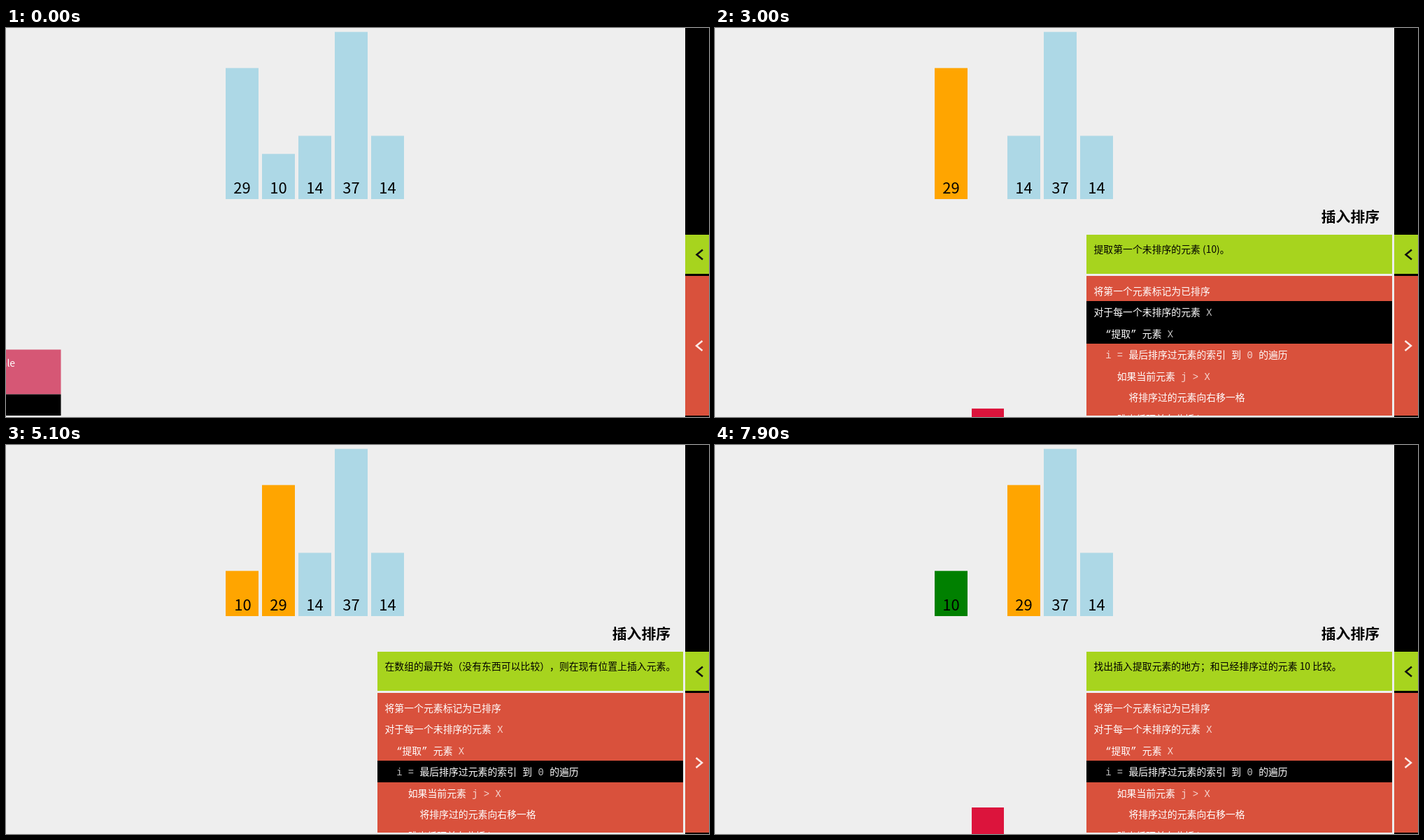
Recreate the animation shown at these times as an HTML page. Size 1005x557 px, loop 8 s.

```html
<!DOCTYPE html>
<html lang="zh-CN">
<head>
<meta charset="utf-8">
<title>插入排序</title>
<style>
  html, body { margin: 0; width: 100%; height: 100%; overflow: hidden; background: #eee; }
  svg { display: block; }
  text { font-family: "Noto Sans CJK SC", "Noto Sans CJK", sans-serif; font-size: 13.87px; text-spacing-trim: space-all; }
  .label { font-size: 22px; text-anchor: middle; }
  .title { font-size: 20.8px; font-weight: 700; text-anchor: end; }
  .code text { font-family: "Liberation Mono", "Noto Sans CJK SC", "Noto Sans CJK", monospace; fill: #fff; }
  .code tspan { fill-opacity: .75; }
  .chevron { fill: none; stroke-width: 2.5; }
</style>
</head>
<body>
<svg id="stage" width="1005" height="557" viewBox="0 0 1005 557">
  <rect width="1005" height="557" fill="#eee"/>
  <g id="bars"></g>

  <g id="menu">
    <rect x="-300" y="460.5" width="378.5" height="64" fill="#d65775"/>
    <rect x="-300" y="524.5" width="378.5" height="30.5"/>
    <text x="13" y="485" text-anchor="end" fill="#fff">scale</text>
  </g>

  <text id="title" class="title" x="950" y="278">插入排序</text>

  <svg class="panel" y="296" height="56">
    <rect width="437" height="56" fill="#a7d41e"/>
    <text id="status" x="10.5" y="26.3"></text>
  </svg>
  <svg class="panel code" y="355" height="200">
    <rect width="437" height="200" fill="#d9513c"/>
    <rect id="mark" width="437"/>
    <g id="code"></g>
  </svg>

  <rect x="971" width="34" height="557"/>
  <rect x="971" y="296" width="34" height="56" fill="#a7d41e"/>
  <rect x="971" y="355" width="34" height="200" fill="#d9513c"/>
  <path class="chevron" d="M996 317.5L987.5 324.5L996 331.5" stroke="#111"/>
  <path id="arrow" class="chevron" d="M995.5 448L987 455L995.5 462" stroke="#fbe9e6"/>
</svg>
<script>
const LOOP = 8000, TICK = 100;
const OPEN = { start: 700, lead: 40, length: 500 };
const MOVE = { lead: 67, length: 250 };
const BLUE = [173, 216, 230], ORANGE = [255, 165, 0], GREEN = [0, 128, 0], RED = [220, 20, 60];
const values = [29, 10, 14, 37, 14];
const FLOOR = 245, UNIT = 6.47, DROP = 364.6;
const ROW = 30.55, PAD = 5.6;

// [indent, text]
const code = [
  [0, '将第一个元素标记为已排序'],
  [0, '对于每一个未排序的元素 X'],
  [2, '“提取” 元素 X'],
  [2, 'i = 最后排序过元素的索引 到 0 的遍历'],
  [4, '如果当前元素 j > X'],
  [6, '将排序过的元素向右移一格'],
  [4, '跳出循环并在此插入 X'],
];

const extract = n => `提取第一个未排序的元素 (${n})。`;
const compare = n => `找出插入提取元素的地方；和已经排序过的元素 ${n} 比较。`;
const shift = (a, b) => `${a} > ${b} 为真，因此将已经排序过的元素 (${a}) 向右移一格。`;

// [time, status, first row, last row, { bar: [slot, dropped, colour, label shift] }]
const steps = [
  [2100, '将第一个元素 (29) 标记为已经排序过。', 0, 0, { 0: [0, 0, ORANGE] }],
  [2800, extract(10), 1, 2, { 1: [1, 1, RED] }],
  [3500, compare(29), 3, 3, { 0: [0, 0, GREEN] }],
  [4200, shift(29, 10), 4, 5, { 0: [1, 0, GREEN], 1: [0, 1, RED] }],
  [4900, '在数组的最开始（没有东西可以比较），则在现有位置上插入元素。', 3, 3,
    { 0: [1, 0, ORANGE], 1: [0, 0, ORANGE, 1] }],
  [5600, extract(14), 1, 2, { 1: [0, 0, ORANGE], 2: [2, 1, RED] }],
  [6300, compare(29), 3, 3, { 0: [1, 0, GREEN] }],
  [7000, shift(29, 14), 4, 5, { 0: [2, 0, GREEN], 2: [1, 1, RED] }],
  [7700, compare(10), 3, 3, { 0: [2, 0, ORANGE], 1: [0, 0, GREEN] }],
];

const states = [values.map((v, i) => [i, 0, BLUE])];
for (const step of steps) states.push(Object.assign([...states.at(-1)], step[4]));

const $ = id => document.getElementById(id);
const set = (el, attrs) => { for (const k in attrs) el.setAttribute(k, attrs[k]); return el; };
const add = (parent, tag, attrs) =>
  parent.appendChild(set(document.createElementNS('http://www.w3.org/2000/svg', tag), attrs));
const clamp = t => Math.min(1, Math.max(0, t));
const mix = (a, b, p) => a + (b - a) * p;
const swing = t => 0.5 - Math.cos(Math.PI * t) / 2;
const cubic = t => t < 0.5 ? 4 * t ** 3 : 1 - 4 * (1 - t) ** 3;

const bars = values.map(v => {
  const label = { class: 'label' };
  const bar = { rect: add($('bars'), 'rect', { height: v * UNIT }), text: add($('bars'), 'text', label) };
  bar.text.textContent = v;
  return bar;
});

code.forEach(([indent, line], i) => {
  const text = add($('code'), 'text', { x: 10.5 + indent * 8.32, y: 26.5 + i * ROW });
  for (const part of line.match(/[ -~]+|[^ -~]+/g)) {
    const latin = /[ -~]/.test(part);
    (latin ? add(text, 'tspan', {}) : text).append(part);
  }
});

function drawBars(from, to, p) {
  bars.forEach(({ rect, text }, i) => {
    const [a, b] = [from[i], to[i]];
    const x = 314 + 52 * mix(a[0], b[0], p);
    const down = mix(a[1], b[1], p);
    const y = FLOOR + DROP * down;
    const rgb = a[2].map((c, k) => Math.round(mix(c, b[2][k], p)));
    set(rect, { x: x + down, width: 47 - down, y: y - values[i] * UNIT, fill: `rgb(${rgb})` });
    set(text, { x: x + 23.5 + (b[3] || 0), y: y - 8 });
  });
}

function drawPanels(time) {
  const started = time >= OPEN.start;
  const p = started ? swing(clamp((time - OPEN.start + OPEN.lead) / OPEN.length)) : 0;
  set($('menu'), { transform: `translate(${-300 * p})` });
  set($('title'), { visibility: started ? 'visible' : 'hidden' });
  set($('arrow'), { transform: `rotate(${180 * p} 991 455)` });
  for (const panel of document.querySelectorAll('.panel')) {
    const width = Math.round(437 * p);
    set(panel, { x: 968 - width, width });
  }
}

function drawStep(time) {
  const n = steps.filter(s => s[0] <= time).length;
  const step = steps[n - 1];
  const p = step ? cubic(clamp((time - step[0] + MOVE.lead) / MOVE.length)) : 1;
  drawBars(states[Math.max(0, n - 1)], states[n], p);

  const edge = row => row ? Math.round(PAD + row * ROW) : 0;
  const top = step ? edge(step[2]) : 0;
  set($('mark'), { y: top, height: step ? edge(step[3] + 1) - top : 0 });
  $('status').textContent = step ? step[1] : '';
}

const origin = performance.now();
function frame() {
  const elapsed = (performance.now() - origin) % LOOP;
  const time = Math.floor(elapsed / TICK) * TICK;
  drawPanels(time);
  drawStep(time);
  requestAnimationFrame(frame);
}
frame();
</script>
</body>
</html>
```
